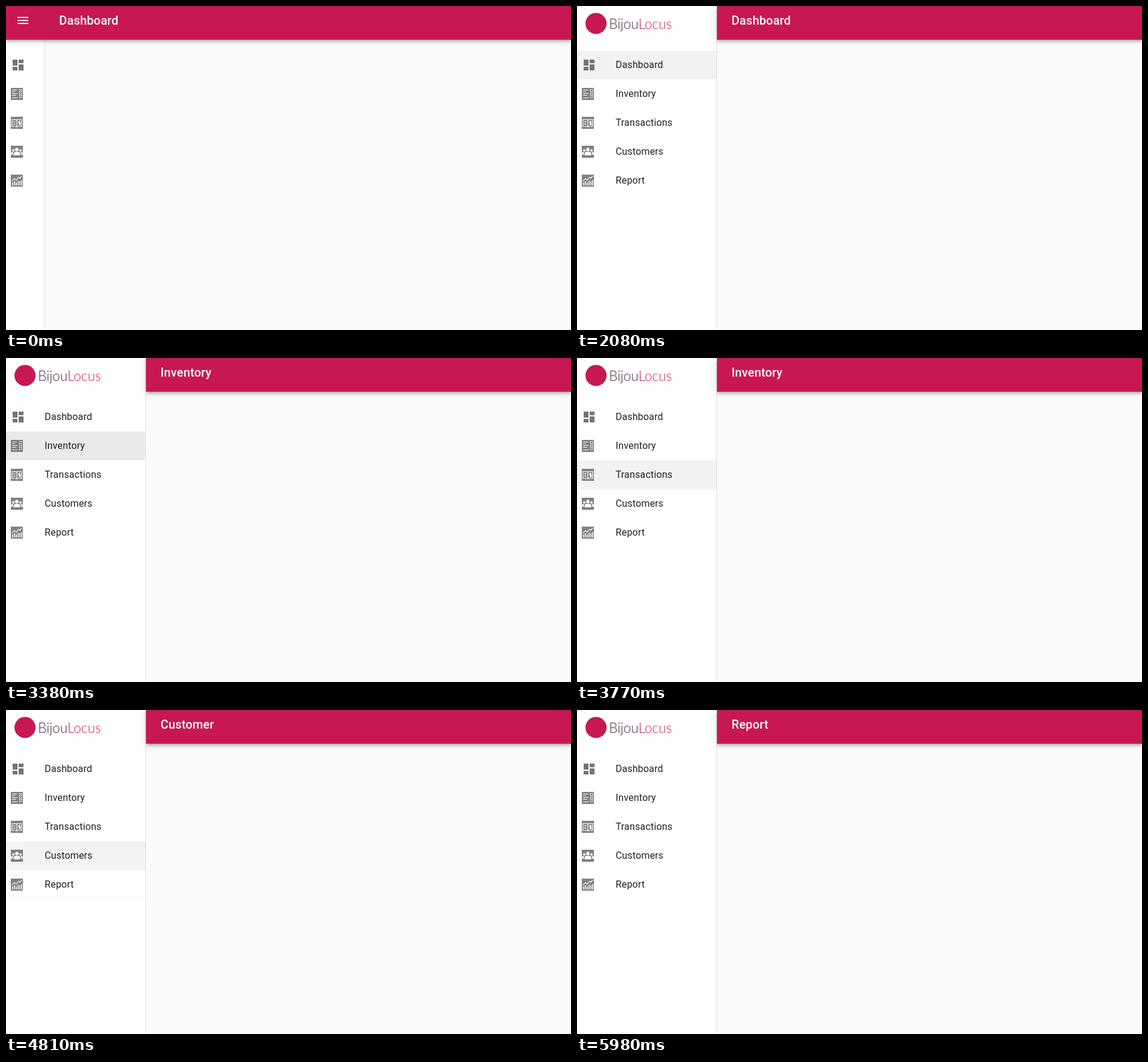
Recreate the animation shown at these times as an HTML page. Size 936 px wide and 538 px high, loop 7.15 s.

```html
<!DOCTYPE html>
<html lang="en">
<head>
<meta charset="utf-8">
<title>Dashboard drawer</title>
<style>
  html, body { margin: 0; width: 100%; height: 100%; overflow: hidden; background: #fafafa; }
  body { position: relative; font-family: Roboto, sans-serif; }
  svg { display: block; }
  #drawer {
    position: absolute; left: 0; top: 0; bottom: 0; box-sizing: border-box;
    overflow: hidden; background: #fff; border-right: 1px solid #e0e0e0;
  }
  #bar {
    position: absolute; top: 0; right: 0; height: 56px; overflow: visible; background: #c71853;
    box-shadow: 0 2px 4px -1px rgba(0,0,0,.2), 0 4px 5px rgba(0,0,0,.14), 0 1px 10px rgba(0,0,0,.12);
  }
  #bar::before { content: ""; position: absolute; left: 0; right: 0; top: 0; height: 1px; background: rgba(60,40,50,.22); }
  #title { font-size: 20px; font-weight: 500; letter-spacing: .15px; fill: #fff; }
  .label { font-size: 16px; letter-spacing: .15px; fill: rgba(0,0,0,.87); }
  .brand { font: 300 22.5px Lato, sans-serif; }
</style>
</head>
<body>
<div id="drawer">
  <svg id="menu" width="231" height="538">
    <circle cx="31.5" cy="29" r="17.5" fill="#c71853"/>
    <text class="brand" x="53" y="38" fill="#4a2848">Bijou<tspan fill="#d5264f">Locus</tspan></text>
  </svg>
</div>
<div id="bar">
  <svg width="400" height="56">
    <path id="burger" d="M19 18h18v2H19zM19 23h18v2H19zM19 28h18v2H19z" fill="#fff"/>
    <text id="title" y="31"></text>
  </svg>
</div>
<script>
const LOOP = 7150, STEP = 130;
const OPEN_AT = 1130, OPEN_MS = 330;
const HOVER_MS = 150, GROW_MS = 550, FADE_MS = 500, PRESS_MS = 117;
const RIPPLE_R = 139;
const $ = id => document.getElementById(id);

// Icons are drawn in a 20 by 20 box.
const tile = inner => `<rect width="20" height="20" fill="#808080"/>${inner}`;
const lines = d => `<path d="${d}" fill="none" stroke="#fff" stroke-width="1.2"/>`;
const icons = {
  dashboard: '<path transform="translate(0 -2)" fill="#757575" d="M3 13h8V3H3zm0 8h8v-6H3zm10 0h8V11h-8zm0-18v6h8V3z"/>',
  inventory: tile(
    lines('M2 3.5h8M2 6.5h5M2 9.5h9M2 12.5h7M2 16.5h9') +
    '<path d="M14.5 2v16M17.5 2v16" stroke="#fff" stroke-width="1.6" stroke-dasharray="2 1.2"/>'),
  transactions: tile(
    lines('M2 4.5h7l1 1 1-1h7v11.5h-7l-1 1-1-1H2zM10 5.5v11') +
    lines('M4 7.5h4M4 10h3M4 12.5h4') +
    lines('M16 7.5h-3v2.7h3v2.7h-3M14.5 6.5v8')),
  customers: tile(
    '<g fill="#fff"><circle cx="10" cy="6.3" r="2.9"/><circle cx="4" cy="7.7" r="2"/><circle cx="16" cy="7.7" r="2"/>' +
    '<path d="M4.5 16v-2q0-4 4-4h3q4 0 4 4v2zM0 15v-2q0-2.5 2.5-2.5H4Q3 12 3 15zM20 15v-2q0-2.5-2.5-2.5H16q1 1.500 1 4.500z"/></g>'),
  report: tile(
    '<path d="M3 18v-5M6 18v-7M9 18v-5M12 18v-8M15 18v-7M17.800 18v-9" stroke="#fff" stroke-width="1.500"/>' +
    lines('M2 10.500L6 6.500 9 9 13 4.500 15 6 18 2.500'))
};

// enter and leave: pointer over the row; press: pointer down
const rows = [
  { label: 'Dashboard', title: 'Dashboard', icon: 'dashboard', enter: 1955, leave: 2880, press: 2150 },
  { label: 'Inventory', title: 'Inventory', icon: 'inventory', enter: 2900, leave: 3580, press: 2960 },
  { label: 'Transactions', title: 'Transaction', icon: 'transactions', enter: 3590, leave: 4220, press: 3790 },
  { label: 'Customers', title: 'Customer', icon: 'customers', enter: 4130, leave: 4760, press: 4350 },
  { label: 'Report', title: 'Report', icon: 'report', enter: 4780, leave: 5420, press: 4983 }
];

rows.forEach((row, i) => {
  $('menu').insertAdjacentHTML('beforeend',
    `<svg y="${74 + 48 * i}" width="231" height="48" overflow="hidden">
      <rect class="hover" width="231" height="48"/>
      <g transform="translate(8 14)">${icons[row.icon]}</g>
      <text class="label" x="64" y="29">${row.label}</text>
      <circle class="ripple" cx="98" cy="16"/>
    </svg>`);
  const item = $('menu').lastElementChild;
  row.hover = item.querySelector('.hover');
  row.ripple = item.querySelector('.ripple');
});

// cubic-bezier(.4, 0, .2, 1)
function ease(x) {
  if (x <= 0) return 0;
  if (x >= 1) return 1;
  let lo = 0, hi = 1, s = .5;
  for (let i = 0; i < 24; i++) {
    s = (lo + hi) / 2;
    const bx = 1.2 * (1 - s) ** 2 * s + .6 * (1 - s) * s * s + s ** 3;
    if (bx < x) lo = s; else hi = s;
  }
  return 3 * (1 - s) * s * s + s ** 3;
}

function drawRow(row, t) {
  const over = ease((t - row.enter) / HOVER_MS) - ease((t - row.leave) / HOVER_MS);
  row.hover.setAttribute('fill-opacity', Math.max(0, over) * .05);
  const grow = ease((t - row.press) / GROW_MS);
  const fade = 1 - ease((t - row.press - PRESS_MS) / FADE_MS);
  row.ripple.setAttribute('r', RIPPLE_R * grow);
  row.ripple.setAttribute('fill-opacity', .87 * (.1 + .2 * grow) * fade);
}

function draw(time) {
  const t = Math.floor(time % LOOP / STEP) * STEP;
  const open = ease((t - OPEN_AT) / OPEN_MS);
  const opened = t >= OPEN_AT;
  $('drawer').style.width = 65 + 167 * open + 'px';
  $('bar').style.left = 232 * open + 'px';
  $('burger').style.display = opened ? 'none' : '';
  $('title').setAttribute('x', opened ? 24 : 88);
  const chosen = rows.filter(row => t >= row.press + PRESS_MS).pop() || rows[0];
  $('title').textContent = chosen.title;
  rows.forEach(row => drawRow(row, t));
}

const start = performance.now();
function tick() {
  draw(performance.now() - start);
  requestAnimationFrame(tick);
}
tick();
</script>
</body>
</html>
```
